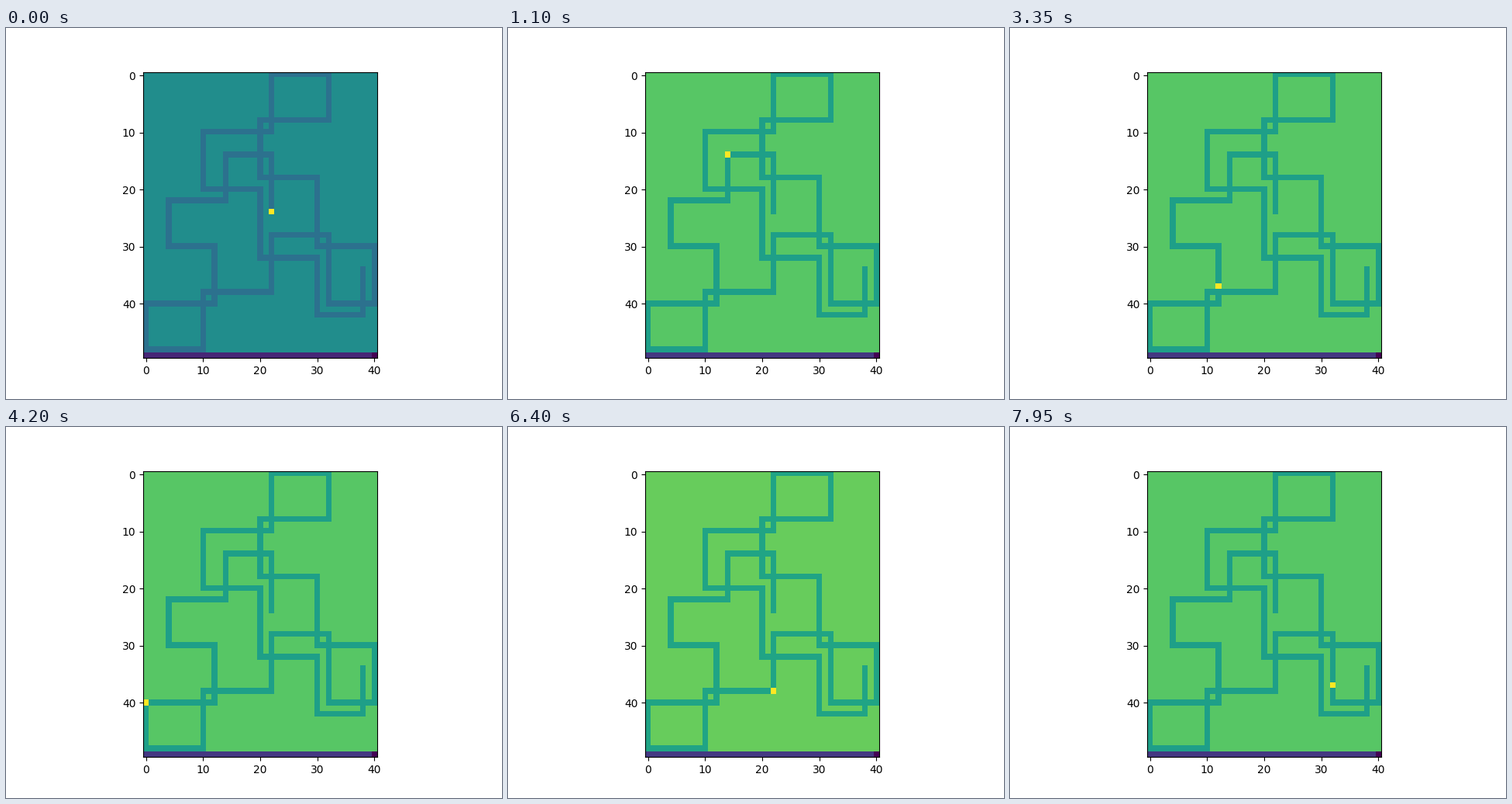
Recreate the animation shown at these times as a matplotlib script. Size 640 by 478 pixels, loop 8 s.

```python
import numpy as np
import matplotlib.pyplot as plt
from matplotlib.animation import FuncAnimation

COLS, ROWS = 41, 50
FRAMES, INTERVAL = 160, 50
HOLD = 2  # frames before the walker starts

SPACE, TRACK, EDGE = ord("."), ord("#"), ord("\n")
STEP = {"U": (0, -1), "D": (0, 1), "L": (-1, 0), "R": (1, 0)}
# The map is shown transposed, so each arrow glyph is turned as well.
GLYPH = {"U": ord("<"), "D": ord(">"), "L": ord("^"), "R": ord("v")}

START = (22, 24)
ROUTE = ("U10 L8 D8 L10 D8 R8 D10 L12 D8 R10 U10 R12 U10 R10 D12 R8 U10 L10 "
         "U12 L10 U10 R12 U8 L10 D10 L12 D10 R10 D12 R10 D10 R8 U8")


def walk():
    """States (x, y, heading): one per turn and one per cell moved."""
    x, y = START
    states = [(x, y, "L")] * HOLD
    for leg in ROUTE.split():
        heading, length = leg[0], int(leg[1:])
        dx, dy = STEP[heading]
        states.append((x, y, heading))
        for _ in range(length):
            x, y = x + dx, y + dy
            states.append((x, y, heading))
    return states


def build_map(states):
    grid = np.full((ROWS, COLS), SPACE)
    grid[-1] = EDGE
    grid[-1, -1] = 0
    for x, y, _ in states:
        grid[y, x] = TRACK
    return grid


states = walk()
base = build_map(states)

fig, ax = plt.subplots(figsize=(6.4, 4.78), dpi=100)
image = ax.imshow(base, cmap="viridis")


def update(frame):
    x, y, heading = states[frame]
    grid = base.copy()
    grid[y, x] = GLYPH[heading]
    image.set_data(grid)
    image.set_clim(grid.min(), grid.max())
    return [image]


anim = FuncAnimation(fig, update, frames=FRAMES, interval=INTERVAL,
                     repeat=True, repeat_delay=0)
plt.show()
```
